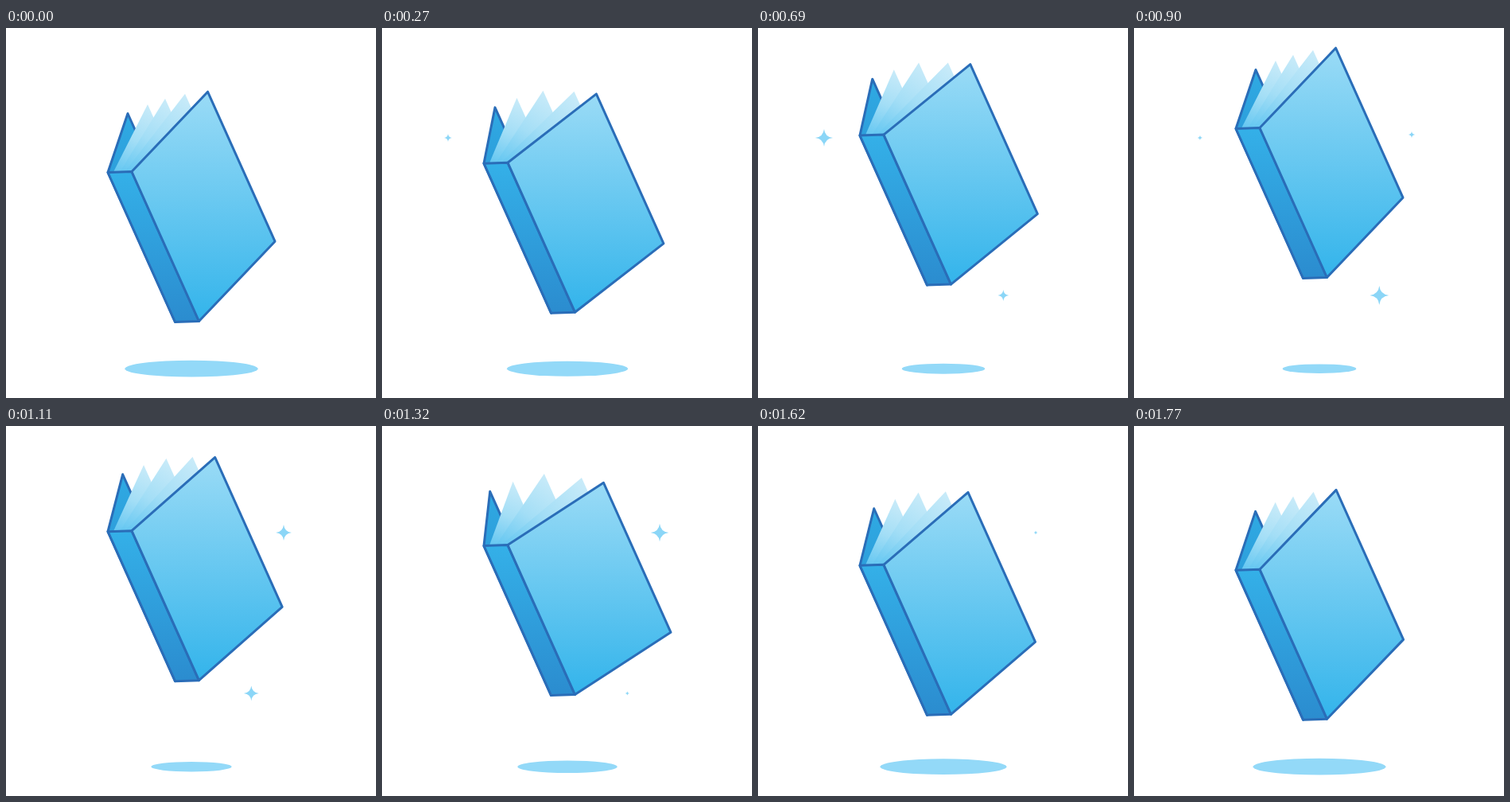
Recreate the animation shown at these times as an HTML page with a canvas. Size 465 by 465 pixels, loop 1800 ms.

```html
<!DOCTYPE html>
<html lang="en">
<head>
<meta charset="utf-8">
<title>Floating book</title>
<style>
html, body { margin: 0; width: 100%; height: 100%; overflow: hidden; background: #fff; }
canvas { display: block; width: 465px; height: 465px; }
</style>
</head>
<body>
<canvas id="stage"></canvas>
<script>
const SIZE = 465, LOOP = 1800, SLOT = 30, STEPS = 48;
const INK = '#2a6db8', PALE = '#93d9f8';
const SPINE = [84.5, 188];

const canvas = document.getElementById('stage');
const ctx = canvas.getContext('2d');
const dpr = window.devicePixelRatio || 1;
canvas.width = canvas.height = SIZE * dpr;

const ease = u => {
  u = Math.max(0, Math.min(1, u));
  return u * u * (3 - 2 * u);
};
// Eased rise from a to b, then fall back from b to c.
const swell = (k, a, b, c) => k < b ? ease((k - a) / (b - a)) : ease((c - k) / (c - b));
const shift = (p, d, s) => [p[0] + d[0] * s, p[1] + d[1] * s];

function gradient(from, to, ...colors) {
  const g = ctx.createLinearGradient(...from, ...to);
  colors.forEach((c, i) => g.addColorStop(i / (colors.length - 1), c));
  return g;
}

function poly(points, fill, outlined) {
  ctx.beginPath();
  points.forEach(p => ctx.lineTo(...p));
  ctx.closePath();
  ctx.fillStyle = fill;
  ctx.fill();
  if (!outlined) return;
  ctx.strokeStyle = INK;
  ctx.lineWidth = 3;
  ctx.lineJoin = 'round';
  ctx.stroke();
}

// A leaf of the book: hinge and free corner, swept along the spine.
const leaf = (hinge, corner) =>
  [hinge, corner, shift(corner, SPINE, 1), shift(hinge, SPINE, 1)];

const pages = [
  { hinge: [135, 181], tip: [178, 96], move: [-14, 5] },
  { hinge: [143, 181], tip: [200, 88.7], move: [4, 2.3] },
  { hinge: [149, 181], tip: [225, 82.8], move: [27, 13.7] }
];

const stars = [
  { x: 83, y: 138, span: [0, 16, 28] },
  { x: 308.3, y: 336, span: [10, 24.5, 39.5] },
  { x: 349, y: 134, span: [18, 33, 47] }
];

function drawBook(open) {
  const back = shift([153, 107.5], [-18, 6], open);
  const front = shift([253.5, 80.2], [26, 23], open);
  const left = [128, 181.5], right = [158, 180.5];

  poly(leaf(left, back), gradient([0, 107], [0, 300], '#2faae3', '#2b8ed0'), true);
  for (const { hinge, tip, move } of pages) {
    const top = shift(tip, move, open);
    poly(leaf(hinge, top), gradient(top, hinge, '#c9ebf9', '#a3def6', '#62c6f1'));
  }
  poly([left, right, shift(right, SPINE, 1), shift(left, SPINE, 1)],
    gradient([0, 181], [0, 369], '#34b0e8', '#2b8ccf'), true);
  poly(leaf(right, front),
    gradient([0, front[1]], [0, 368], '#9adbf6', '#33b4eb'), true);
}

function drawStar({ x, y, span }, k) {
  const r = 12 * swell(k, ...span);
  if (r <= 0) return;
  const c = r * 0.1;
  ctx.beginPath();
  ctx.moveTo(x, y - r);
  ctx.quadraticCurveTo(x + c, y - c, x + r, y);
  ctx.quadraticCurveTo(x + c, y + c, x, y + r);
  ctx.quadraticCurveTo(x - c, y + c, x - r, y);
  ctx.quadraticCurveTo(x - c, y - c, x, y - r);
  ctx.fillStyle = '#8bd6f7';
  ctx.fill();
}

function draw(time) {
  const slot = Math.floor((time % LOOP) / SLOT);
  const k = Math.floor(slot * STEPS * SLOT / LOOP);
  const lift = swell(k, 0, STEPS / 2, STEPS);
  const open = k < 24 ? swell(k, 0, 12.2, 24) : swell(k, 24, 36.5, 48);

  ctx.setTransform(dpr, 0, 0, dpr, 0, 0);
  ctx.fillStyle = '#fff';
  ctx.fillRect(0, 0, SIZE, SIZE);

  const scale = 1 - 0.445 * lift;
  ctx.beginPath();
  ctx.ellipse(233, 428.2, 83.6 * scale, 10.4 * scale, 0, 0, Math.PI * 2);
  ctx.fillStyle = PALE;
  ctx.fill();

  stars.forEach(s => drawStar(s, k));
  ctx.translate(0, -55 * lift);
  drawBook(open);
}

let start;
function tick(now) {
  if (start === undefined) start = now;
  draw(Math.max(0, now - start));
  requestAnimationFrame(tick);
}
draw(0);
requestAnimationFrame(tick);
</script>
</body>
</html>
```
